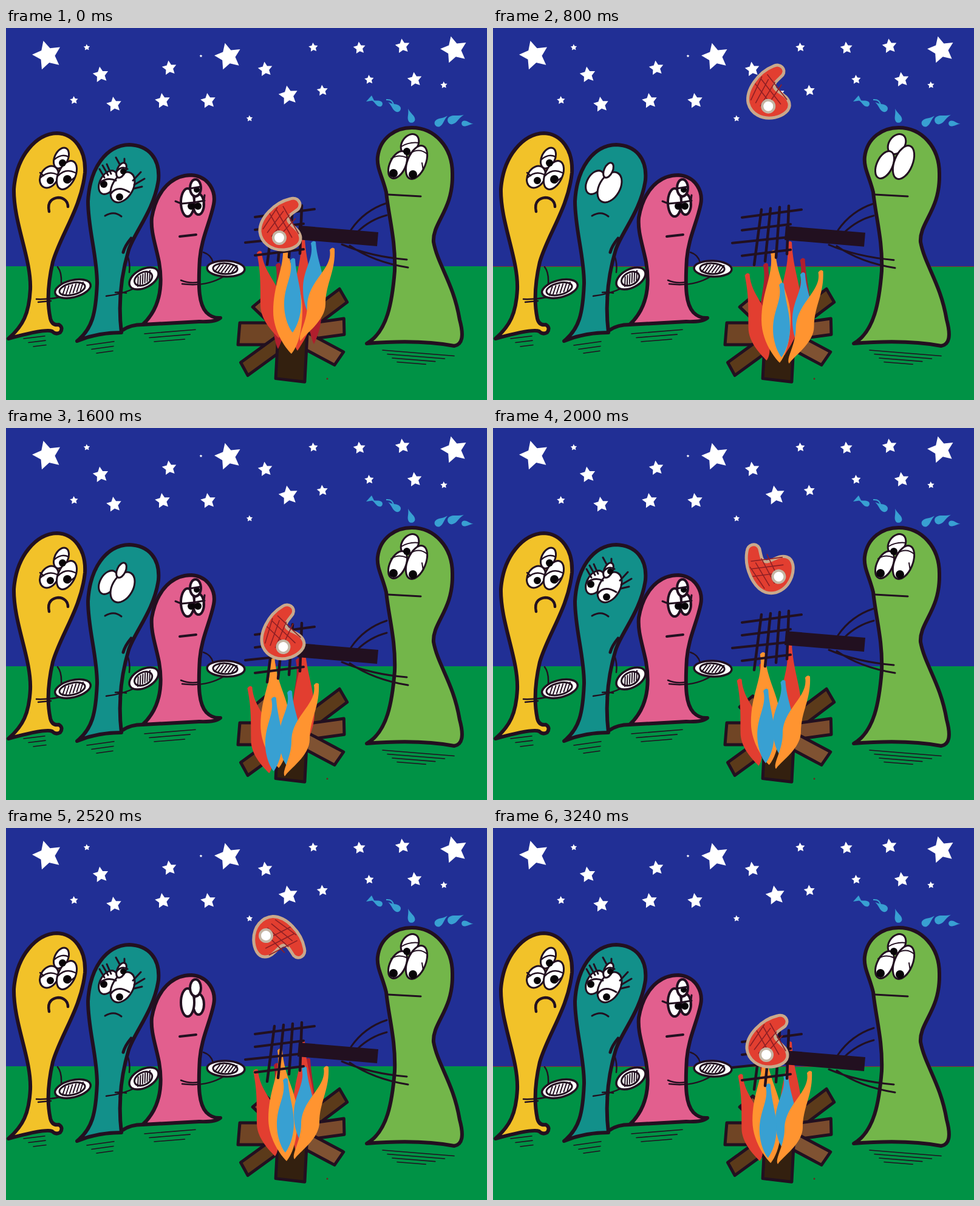
An HTML page that plays this animation: 792 px wide and 612 px high, repeating every 3280 ms.

```html
<!DOCTYPE html>
<html>
<head>
<meta charset="utf-8">
<title>Campfire</title>
<style>
html, body { margin: 0; width: 100%; height: 100%; overflow: hidden; background: #212f95; }
svg { display: block; }
.ink { fill: none; stroke: #221020; stroke-linecap: round; stroke-linejoin: round; }
.body { stroke: #221020; stroke-width: 6; stroke-linejoin: round; }
.log { stroke: #221020; stroke-width: 5; stroke-linejoin: round; }
</style>
</head>
<body>
<svg id="stage" width="792" height="612" viewBox="0 0 792 612"></svg>
<script>
const LOOP = 3280, STEP = 40;
const SKY = '#212f95', GROUND = '#009245', INK = '#221020';
const BLUE = '#38a0d2', RED = '#e23e30', DARK = '#b01e2d', ORANGE = '#ff9430';

const range = n => [...Array(n).keys()];
const repeat = (n, f) => range(n).map(f).join('');
const path = (d, fill, extra = '') => `<path d="${d}" fill="${fill}" ${extra}/>`;
const ink = (d, w = 3) => `<path class="ink" d="${d}" stroke-width="${w}"/>`;
const body = (d, fill) => path(d, fill, 'class="body"');
const dot = (x, y, r, fill = '#080508') => `<circle cx="${x}" cy="${y}" r="${r}" fill="${fill}"/>`;
const group = (id, inner) => `<g id="${id}">${inner}</g>`;
const place = (x, y, turn, inner, scale = 1) =>
  `<g transform="translate(${x} ${y}) rotate(${turn}) scale(${scale})">${inner}</g>`;
const oval = (x, y, rx, ry, turn = 0, w = 3) => place(x, y, turn,
  `<ellipse rx="${rx}" ry="${ry}" fill="#fff" stroke="${INK}" stroke-width="${w}"/>`);

// Bigger stars lean further
function star([x, y, r]) {
  const pts = range(10).map(i => {
    const a = (i * 36 - 90 - r * 0.6) * Math.PI / 180, q = i % 2 ? r / 2 : r;
    return (x + q * Math.cos(a)).toFixed(1) + ',' + (y + q * Math.sin(a)).toFixed(1);
  });
  return `<polygon points="${pts.join(' ')}" fill="#fff"/>`;
}
const stars = [
  [68, 45, 25], [133, 32, 5.5], [156, 77, 13.5], [112, 119, 7], [178, 126, 13], [258, 120, 13], [269, 66, 12.5],
  [321, 46, 2.5], [333, 120, 13], [366, 47, 23], [427, 68, 12.5], [401, 149, 5.5], [465, 111, 16.5], [506, 32, 8],
  [521, 103, 9.5], [582, 33, 10.5], [598, 85, 8], [653, 30, 12.5], [673, 85, 12.5], [721, 94, 6], [738, 36, 23]
].map(star).join('');

const tear = (x, y, turn, scale) =>
  place(x, y, turn, path('M24 0C12-2 8-8 0-7C-8-6-8 6 0 7C8 8 12 2 24 0Z', BLUE), scale);
const sweat = tear(616, 125, 205, 0.65) + tear(645, 133, 215, 0.8) + tear(668, 151, -108, 0.8) +
  tear(711, 157, -38, 0.85) + tear(733, 152, -24, 0.95) + tear(754, 157, 3, 0.65) +
  path('M593 121L602 111L606 119Z', BLUE) + path('M626 118Q637 117 638 127', 'none', `stroke="${BLUE}" stroke-width="2"`);

// Ground shadow: a stack of shrinking strokes
const shadow = (x, y, length, slope, n) => ink(repeat(n, i => {
  const l = length * (1 - 0.2 * i);
  return `M${x + i * 8} ${y + i * 6.5}l${l} ${l * slope}`;
}), 1.6);
const shadows = shadow(29, 511, 35, -0.12, 3) + shadow(133, 522, 45, -0.14, 3) +
  shadow(228, 503, 84, -0.08, 3) + shadow(620, 530, 118, 0.08, 4) + dot(529, 577, 1.5, '#6b2a20');

// Pupils, lids and lashes vanish in a blink
const eyes = (id, whites, pupils, lids, w = 2.5) =>
  whites.map(e => oval(...e)).join('') + group(id, pupils.map(p => dot(...p)).join('') + ink(lids, w));

const plate = (x, y, rx, ry, turn, fill) => place(x, y, turn,
  oval(0, 0, rx, ry, 0, 3.5) + oval(-1, 0, rx * fill, ry * 0.68) +
  ink(repeat(6, i => `M${(i - 2.5) * rx * fill * 0.28 - 4} ${ry * 0.45}l8 ${-ry * 0.9}`), 2));

const yellow =
  body('M4 511C28 490 38 470 40 430C42 380 12 320 13 265C17 210 50 174 84 173C112 174 132 200 130 238C124 296 90 340 77 385C69 420 67 450 73 478Q76 490 87 488Q95 493 89 501Q82 505 76 499Q66 494 4 511Z', '#f2c229') +
  eyes('yellowLook', [[91, 214, 11, 18, 25], [71, 245, 14, 19, 30], [100, 242, 14, 25, 25]],
    [[93, 222, 6], [73, 251, 6], [101, 249, 7]],
    'M80 216Q92 206 103 212M57 246Q70 234 84 241M86 243Q98 230 114 238M56 238L62 243M104 253L113 246') +
  ink('M71 302C67 284 78 280 86 279C96 279 102 286 102 294', 4.5) +
  ink('M50 446Q75 447 101 440M53 451L74 449M85 393Q92 402 91 420', 2.5) +
  plate(110, 429, 30, 14, -14, 0.72);

const teal =
  body('M117 515C142 495 148 470 150 420C150 375 135 330 135 285C138 230 165 193 203 192C235 193 254 215 251 250C244 300 212 335 202 365C190 405 184 450 190 501Q150 501 117 515Z', '#12908a') +
  eyes('tealLook', [[168, 254, 13, 21, 30], [192, 262, 17, 27, 30], [190, 234, 7, 13, 25]],
    [[161, 257, 6], [187, 278, 6], [193, 236, 5]],
    'M155 254Q167 245 181 251M173 272Q184 258 203 270M182 236Q190 226 200 232M162 246L154 232M168 242L159 226M173 240L166 224M187 224L181 213M195 222L195 215M211 258L228 248M211 264L224 261M209 251L222 237', 3) +
  ink('M163 309Q178 300 190 310') + ink('M206 346Q196 358 193 369', 5) +
  ink('M165 441Q192 438 214 427M180 435Q190 434 198 436M200 374Q205 388 203 402', 2.5) +
  plate(227, 412, 26, 15, -28, 0.6);

const pink =
  body('M225 488C255 460 258 420 252 385C246 355 238 335 240 312C248 265 275 242 305 242C335 244 346 270 342 290C336 320 322 345 319 380C316 430 318 455 330 468Q340 478 353 477Q345 484 318 483Z', '#e25f8e') +
  ink('M192 497Q205 488 225 488', 6) +
  eyes('pinkLook', [[317, 290, 9, 17, 0, 4], [299, 287, 11, 23, 0, 4], [312, 263, 9, 14, 0, 4]],
    [[305, 293, 6], [316, 293, 6], [314, 266, 5]],
    'M279 285L289 289L309 287L327 284M303 264L321 261M327 275L325 291', 3) +
  ink('M286 343L313 340', 4) +
  ink('M288 415Q302 421 318 418M290 421Q330 426 358 409M325 369Q338 373 341 386', 2.5) +
  plate(362, 396, 31, 13, 2, 0.65);

const green =
  body('M594 519C628 500 636 450 640 400C642 350 630 310 626 270C620 245 610 230 612 212C616 180 642 164 668 164C705 164 736 195 735 242C736 300 702 320 704 352C711 390 737 420 747 480Q758 520 738 523Q680 512 594 519Z', '#73b64a') +
  eyes('greenLook', [[665, 191, 13, 18, 35], [645, 225, 13, 24, 25], [676, 221, 15, 29, 22]],
    [[660, 203, 6], [638, 239, 7], [670, 241, 7]],
    'M651 195Q664 187 680 189M634 215Q646 207 659 213M664 207Q680 196 693 207M685 222L687 234', 2) +
  ink('M629 274L683 277');

// Logs fan out from the middle of the fire: angle, length, width
const logs = [
  [-136, 78, 28, '#7a4b2d'], [-37, 106, 25, '#5b3a1a'], [180, 90, 36, '#704525'], [-8, 87, 26, '#7a4b2d'],
  [144, 100, 24, '#5b3a1a'], [28, 88, 26, '#7f5232'], [93, 78, 48, '#33200f']
].map(([turn, length, width, fill]) => place(472, 503, turn,
  path(`M0 ${-width / 2}h${length}l-3 ${width}H0Z`, fill, 'class="log"'))).join('');

// Flames, back to front. lean: foot offset, bow and girth: belly; sway and lift: share of the fire's drift
const flames = [
  { fill: DARK, height: 140, lean: 0, bow: 2, girth: 11, x: 448, y: 388, sway: 0.3, lift: 0 },
  { fill: DARK, height: 140, lean: 0, bow: 2, girth: 11, x: 507, y: 380, sway: 1, lift: 0 },
  { fill: RED, height: 186, lean: -8, bow: 2, girth: 18, x: 488, y: 345, sway: 0, lift: 0.2 },
  { fill: RED, height: 142, lean: 32, bow: 19, girth: 17, x: 417, y: 368, sway: 0.6, lift: 1 },
  { fill: ORANGE, height: 184, lean: 11, bow: 5, girth: 24, x: 459, y: 352, sway: 0.8, lift: 0.4 },
  { fill: BLUE, height: 124, lean: -3, bow: 0, girth: 17, x: 506, y: 352, sway: 1.5, lift: 1.4 },
  { fill: BLUE, height: 121, lean: 0, bow: 0, girth: 14, x: 472, y: 380, sway: 1.2, lift: 1.1 },
  { fill: ORANGE, height: 152, lean: -52, bow: -26, girth: 15, x: 537, y: 363, sway: 1, lift: 1 }
];
function flame({ fill, height: h, lean, bow, girth: g }) {
  const l = bow - g, r = bow + g;
  return path(`M-4 2C2 ${h * 0.22} ${l} ${h * 0.35} ${l} ${h * 0.62}C${l} ${h * 0.8} ${lean - g * 0.4} ${h * 0.95} ${lean} ${h}` +
    `C${lean + g * 0.5} ${h * 0.92} ${r} ${h * 0.78} ${r} ${h * 0.6}C${r} ${h * 0.38} 6 ${h * 0.25} 4 0Q0-4-4 2Z`, fill);
}

const grill =
  ink(repeat(4, i => `M${i === 2 ? 394 : 410} ${(i === 2 ? 319 : 317) + 21 * i - (i === 2 ? 2 : 0)}L${i ? 490 : 508} ${(i ? 307 : 304) + 21 * i}`), 4) +
  ink(repeat(4, i => `M${442 + 15 * i} ${304 - 2 * i}L${430 + 18 * i} ${395 - 6 * i}`), 4.5) +
  path('M482 331L613 342L611 365L480 354Z', INK) +
  ink('M568 338Q590 306 627 294M579 341Q600 321 627 314M553 362Q600 382 660 387M566 364Q605 391 662 400', 3);

const meat =
  path('M18-42C30-46 39-34 31-25C22-18 12-14 15-6C18 2 34 8 35 22C36 34 22 41 8 42C-14 43-30 30-32 12C-33-10-8-36 18-42Z', RED,
    'stroke="#c9a98c" stroke-width="5"') +
  path(repeat(4, i => `M${-27 + 7 * i} ${8 + 6 * i}l${24 + 3 * i} -36`) + repeat(3, i => `M${-16 + 11 * i} ${-18 - 6 * i}l26 46`),
    'none', 'stroke="#8e1f24" stroke-width="1.6"') +
  '<circle cy="22" r="10" fill="#fff" stroke="#c4b5a4" stroke-width="4"/>';

const el = id => document.getElementById(id);
const move = (id, x, y, turn = 0) => el(id).setAttribute('transform', `translate(${x} ${y}) rotate(${turn})`);
const show = (id, on) => el(id).setAttribute('visibility', on ? 'visible' : 'hidden');
const within = (t, spans) => spans.some(([a, b]) => t >= a && t < b);

el('stage').innerHTML = `<rect width="792" height="612" fill="${SKY}"/><rect y="392" width="792" height="220" fill="${GROUND}"/>` +
  group('horizon', '<rect y="392" width="792" height="1" fill="#843a2a"/>') +
  stars + shadows + sweat + yellow + teal + pink + green + logs +
  flames.map((f, i) => group('flame' + i, flame(f))).join('') +
  group('grill', grill) + group('meat', meat);

// Linear interpolation through [time, value] pairs
function along(keys, t) {
  let i = 0;
  while (i < keys.length - 2 && t >= keys[i + 1][0]) i++;
  const [a, u] = keys[i], [b, v] = keys[i + 1];
  return u + (v - u) * Math.min(1, (t - a) / (b - a));
}

const grillY = [[0, -6], [480, -10], [1160, 0], [1600, 23], [2000, 3], [2520, 22], [2760, -6], [3240, 35]];
const fireX = [[0, 0], [480, 14], [1600, -26], [2520, -10], [3240, -16]];
const fireY = [[0, 0], [480, 12], [1160, 65], [1600, 58], [2520, 30], [3240, 38]];

// Tosses: launch time and height, peak, landing, curve of the arc
const tosses = [
  [0, 323, 256, 106, 505, 308, 2], [590, 310, 815, 106, 1050, 314, 2],
  [1114, 314, 1348, 136, 1590, 338, 2], [1868, 321, 2370, 62, 2640, 311, 1.3]
];
function meatY(t) {
  const toss = tosses.find(q => t >= q[0] && t < q[4]);
  if (!toss) return along(grillY, t) + 316;
  const [t0, y0, peak, top, t1, y1, curve] = toss;
  const [from, end] = t < peak ? [y0, t0] : [y1, t1];
  return top + (from - top) * ((t - peak) / (end - peak)) ** curve;
}

// A slow drift, then one full flip in the last toss
const flipStart = 1868, flipEnd = 2760;
const meatTurn = t => t < flipStart ? -17 * Math.min(1, t / 1600)
  : -17 - 343 * Math.min(1, (t - flipStart) / (flipEnd - flipStart));

const blinks = {
  yellowLook: [[200, 360]], tealLook: [[720, 880], [1520, 1680]],
  greenLook: [[760, 920]], pinkLook: [[2440, 2600]]
};

function draw(now) {
  const t = Math.floor(now % LOOP / STEP) * STEP;
  const dx = along(fireX, t), dy = along(fireY, t);
  flames.forEach((f, i) => move('flame' + i, f.x + dx * f.sway, f.y + dy * f.lift));
  move('grill', 0, along(grillY, t));
  move('meat', 450, meatY(t), meatTurn(t));
  for (const id in blinks) show(id, !within(t, blinks[id]));
  show('horizon', within(t, [[520, 1240], [2560, LOOP]]));
}

const start = performance.now();
function tick() {
  draw(performance.now() - start);
  requestAnimationFrame(tick);
}
tick();
</script>
</body>
</html>
```
